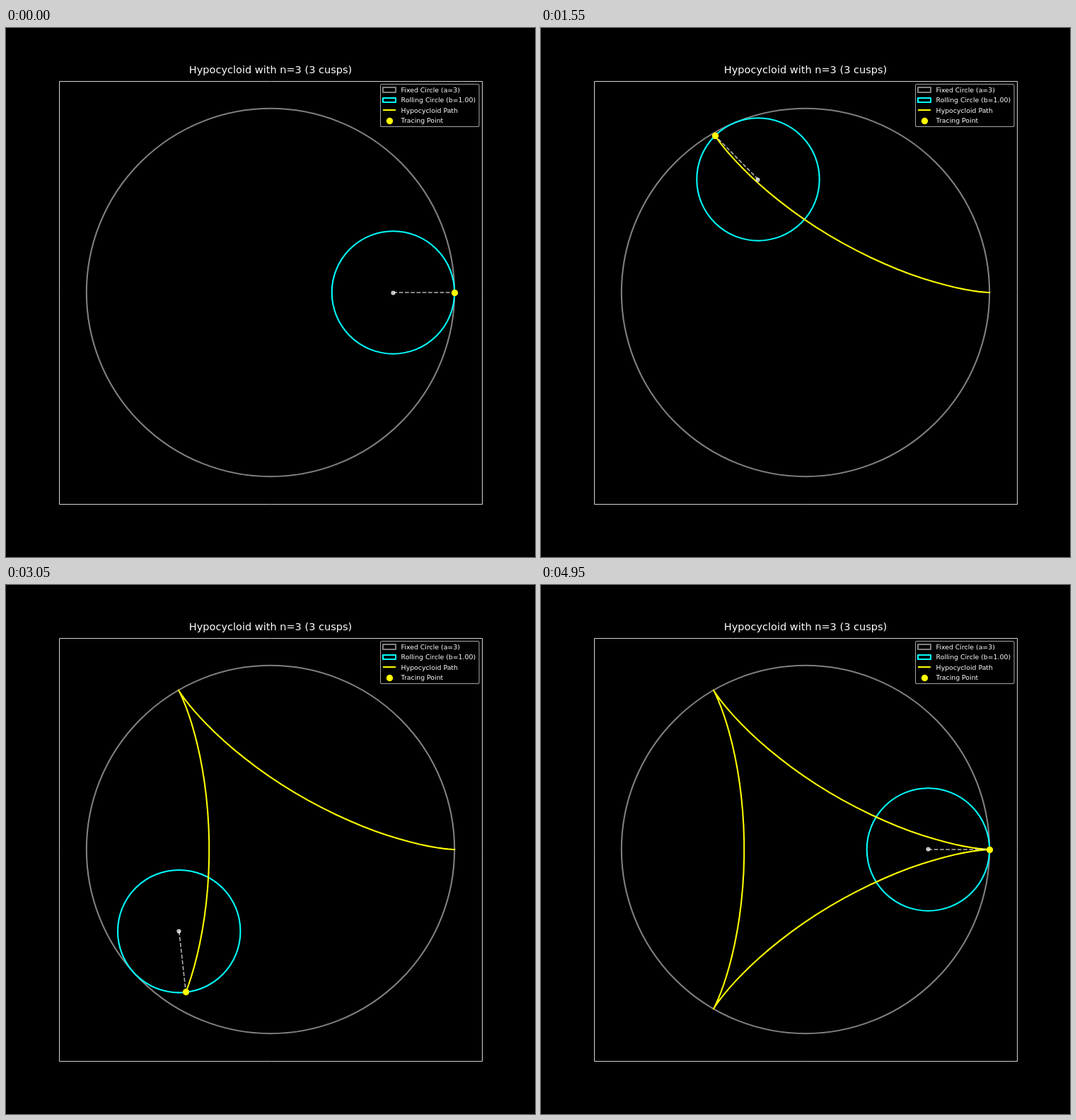
Animation, 748 px wide and 748 px high, one loop 5 s. Source, as an HTML page with a canvas:

```html
<!DOCTYPE html>
<html lang="en">
<head>
<meta charset="utf-8">
<title>Hypocycloid</title>
<style>
  html, body { margin: 0; width: 100%; height: 100%; overflow: hidden; background: #000; }
  canvas { display: block; }
</style>
</head>
<body>
<canvas id="stage" width="748" height="748"></canvas>
<script>
const ctx = document.getElementById('stage').getContext('2d');
const CENTER = 374, UNIT = 598.4 / 6.9;   // pixels per plot unit
const PT = 74.8 / 72;                     // pixels per typographic point
const STEPS = 100, STEP_MS = 50;
const GRAY = '#808080', CYAN = '#0ff', YELLOW = '#ff0';
const FONT = '"DejaVu Sans", sans-serif';

const toStage = (x, y) => [CENTER + x * UNIT, CENTER - y * UNIT];
const angleAt = step => 2 * Math.PI * step / (STEPS - 1);
const rollCenter = a => toStage(2 * Math.cos(a), 2 * Math.sin(a));
const tracePoint = a => toStage(
  2 * Math.cos(a) + Math.cos(2 * a),
  2 * Math.sin(a) - Math.sin(2 * a));

function stroke(color, points) {
  ctx.strokeStyle = color;
  ctx.lineWidth = points * PT;
  ctx.stroke();
}

function circle([x, y], radius, color) {
  ctx.beginPath();
  ctx.arc(x, y, radius, 0, 2 * Math.PI);
  stroke(color, 2);
}

function line(points, color, width) {
  ctx.beginPath();
  points.forEach(p => ctx.lineTo(...p));
  stroke(color, width);
}

function marker([x, y], size, color) {
  ctx.beginPath();
  ctx.arc(Math.floor(x) + 0.5, Math.floor(y) + 0.5, size * PT / 2, 0, 2 * Math.PI);
  ctx.fillStyle = color;
  ctx.fill();
  stroke(color, 1);
}

function text(label, x, y, points, align) {
  ctx.font = `${points * PT}px ${FONT}`;
  ctx.textAlign = align;
  ctx.fillStyle = '#fff';
  ctx.fillText(label, x, y);
}

function box(x, y, w, h, color, width, radius = 0) {
  ctx.beginPath();
  ctx.roundRect(x, y, w, h, radius);
  stroke(color, width);
}

function drawLegend() {
  ctx.fillStyle = 'rgba(0, 0, 0, 0.8)';
  ctx.fillRect(529, 80, 140, 60);
  box(529.5, 79.5, 139.5, 60, 'rgba(204, 204, 204, 0.8)', 1, 2);
  box(533, 84, 18, 7, GRAY, 2);
  box(533, 99, 18, 6, CYAN, 2);
  line([[533, 116], [551, 116]], YELLOW, 2);
  marker([542, 131], 8, YELLOW);
  ['Fixed Circle (a=3)', 'Rolling Circle (b=1.00)', 'Hypocycloid Path', 'Tracing Point']
    .forEach((label, i) => text(label, 558.6, 90.6 + 14.5 * i, 9, 'left'));
}

function draw(step) {
  const angle = angleAt(step);
  const hub = rollCenter(angle), tip = tracePoint(angle);
  ctx.fillStyle = '#000';
  ctx.fillRect(0, 0, 748, 748);
  ctx.lineJoin = 'round';

  circle([CENTER, CENTER], 3 * UNIT, GRAY);
  circle(hub, UNIT, CYAN);

  ctx.lineCap = 'square';
  if (step > 0) {
    line(Array.from({ length: step + 1 }, (_, i) => tracePoint(angleAt(i))), YELLOW, 2);
  }
  ctx.lineCap = 'butt';

  ctx.globalAlpha = 0.7;
  ctx.setLineDash([5.55 * PT, 2.4 * PT]);
  line([hub, tip], '#fff', 1.5);
  ctx.setLineDash([]);
  marker(hub, 5, '#fff');
  ctx.globalAlpha = 1;
  marker(tip, 8, YELLOW);

  box(75.5, 75.5, 598, 598, '#fff', 0.8);
  text('Hypocycloid with n=3 (3 cusps)', CENTER, 64.4, 14, 'center');
  drawLegend();
}

function tick(now) {
  draw(Math.floor(now / STEP_MS) % STEPS);
  requestAnimationFrame(tick);
}
draw(0);
requestAnimationFrame(tick);
</script>
</body>
</html>
```
